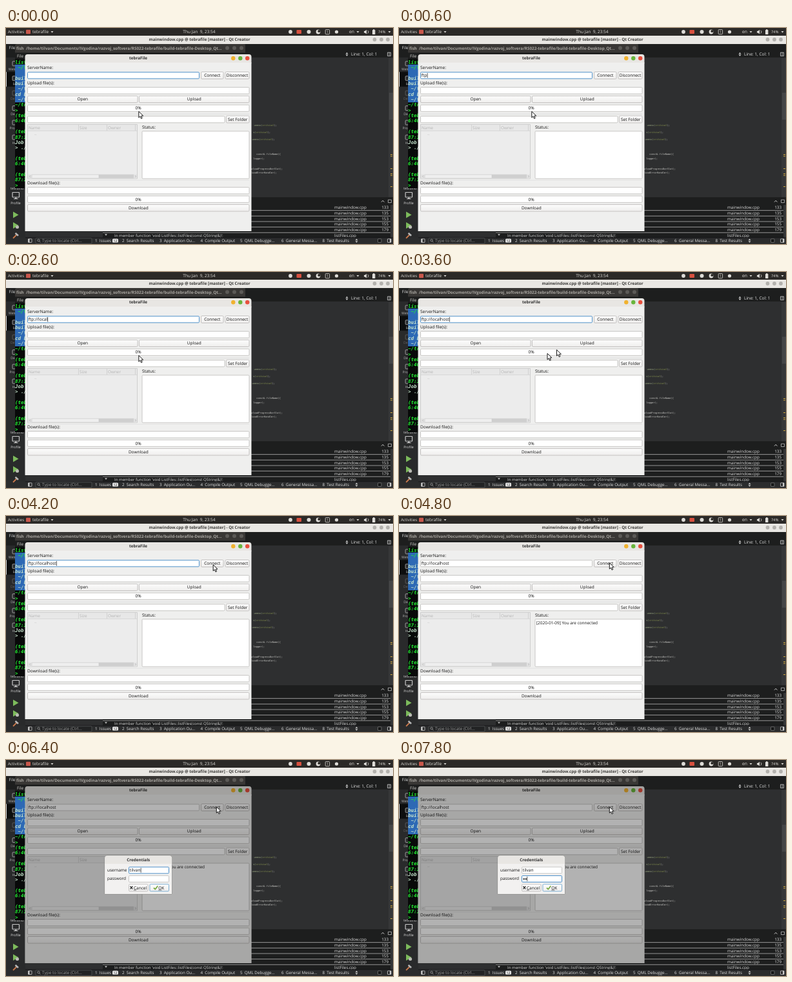
Animation of 600 by 337 pixels, one loop 8000 ms. Source, as an HTML page with a canvas:

```html
<!DOCTYPE html>
<html lang="en">
<head>
<meta charset="utf-8">
<title>tebraFile</title>
<style>
html, body { margin: 0; width: 100%; height: 100%; overflow: hidden; background: #1c1c1c; }
canvas { display: block; }
</style>
</head>
<body>
<canvas id="stage" width="600" height="337"></canvas>
<script>
const g = document.getElementById('stage').getContext('2d');
const LOOP = 8000;
const SANS = '"Open Sans", "Noto Sans", sans-serif';
const MONO = '"DejaVu Sans Mono", monospace';
const USER = 'tilvan';
const HOST = 'ftp://localhost';
const INK = '#121212';
const PANEL = '#1d1e1e';

function rect(x, y, w, h, color) {
  g.fillStyle = color;
  g.fillRect(x, y, w, h);
}

function box(x, y, w, h, r, fill, stroke, width = 0.8) {
  g.beginPath();
  g.roundRect(x, y, w, h, r);
  g.fillStyle = fill;
  g.fill();
  if (!stroke) return;
  g.strokeStyle = stroke;
  g.lineWidth = width;
  g.stroke();
}

function dot(x, y, r, color) {
  g.beginPath();
  g.arc(x, y, r, 0, Math.PI * 2);
  g.fillStyle = color;
  g.fill();
}

function poly(points, color) {
  g.beginPath();
  points.forEach(([x, y]) => g.lineTo(x, y));
  g.closePath();
  g.fillStyle = color;
  g.fill();
}

function line(points, color, width = 1) {
  g.beginPath();
  points.forEach(([x, y]) => g.lineTo(x, y));
  g.strokeStyle = color;
  g.lineWidth = width;
  g.stroke();
}

function text(s, x, y, color, { size = 6.6, style = '500', align = 'left', font = SANS } = {}) {
  g.font = `${style} ${size}px ${font}`;
  g.textAlign = align;
  g.fillStyle = color;
  g.fillText(s, x, y);
  return g.measureText(s).width;
}

const bold = { style: 'bold', size: 6.35 };
const center = { align: 'center' };

const down = (x, y, color) => poly([[x - 2, y - 1], [x + 2, y - 1], [x, y + 1.5]], color);
const up = (x, y, color) => poly([[x - 2, y + 1], [x + 2, y + 1], [x, y - 1.5]], color);

function topBar() {
  rect(0, 0, 600, 12, '#2b2927');
  const ink = '#dedcd8';
  text('Activities', 3, 8.3, ink, { size: 6.1 });
  box(31, 2.8, 7, 6.4, 1, '#c9574c');
  text('tebrafile', 41, 8.3, ink, { size: 6.5 });
  down(71.5, 6, ink);
  text('Thu Jan  9, 23:54', 299.5, 8.3, ink, { ...center, size: 6.6 });
  dot(441, 6, 2.9, ink);
  box(450.5, 3, 7.5, 6, 1, '#d9503f');
  dot(469.5, 6, 3, ink);
  dot(484, 6, 3.4, ink);
  dot(485.4, 5, 2.1, '#2b2927');
  box(495.2, 2.5, 6.4, 7.2, 1, '#2b2927', ink);
  text('1', 498.4, 8.2, ink, { ...center, size: 5.5 });
  dot(512.5, 6, 2.6, ink);
  text('en', 532, 8.3, ink, { size: 6.8 });
  down(545.5, 6, ink);
  poly([[555, 4.7], [556.7, 4.7], [559, 2.7], [559, 9.5], [556.7, 7.5], [555, 7.5]], ink);
  g.beginPath();
  g.arc(559, 6.1, 2.8, -1, 1);
  g.strokeStyle = ink;
  g.lineWidth = 0.9;
  g.stroke();
  box(568, 3, 4.4, 7, 0.6, ink);
  rect(569.2, 2, 2, 1, ink);
  text('74%', 577, 8.2, ink, { size: 5.8 });
  down(594.5, 6, ink);
}

function editor() {
  rect(0, 12, 600, 325, '#2e2f30');
  rect(0, 12, 600, 13, '#e9e7e3');
  text('mainwindow.cpp @ tebrafile [master] - Qt Creator', 300, 20.4, '#3c3b39', { ...bold, align: 'center' });
  [571.5, 582, 592].forEach(x => dot(x, 18, 2.9, '#b3b1ad'));

  rect(371, 25, 229, 21, PANEL);
  up(528.5, 39.5, '#ccc');
  down(528.5, 42.5, '#ccc');
  text('Line: 1, Col: 1', 535, 43.2, '#e2e2e2');
  box(591.5, 38.2, 5, 5.5, 0, PANEL, '#ccc');
  rect(593.7, 38.2, 0.8, 5.5, '#ccc');

  const code = { size: 3.7, align: 'right', font: MONO };
  [['uness(', 'critical', 152.6, 420], ['s(', 'critical', 163.8, 410], ['uness(', 'critical', 175, 417]]
    .forEach(([head, word, y, end]) => {
      const tail = text(');', end, y, '#b9b9b4', code);
      const w = text(word, end - tail, y, '#8c9a52', { ...code, style: 'italic' });
      text(head, end - tail - w, y, '#9fae86', code);
    });
  [['const& fileName){', 198, 426], ['logger);', 204.5, 401], ['MainWindow::uploadProgressBarSlot);', 221, 429], ['MainWindow::uploadErrorHandler);', 227, 420]]
    .forEach(([s, y, end]) => text(s, end, y, '#c9c9c5', code));
  rect(593, 47, 7, 217, '#363738');
  rect(594, 101, 6, 42, '#454647');
  [197, 199.5, 219, 227, 229.5, 247].forEach(y => rect(596, y, 3, 1, '#d1a83c'));
}

function issues() {
  rect(150, 264, 450, 63, PANEL);
  line([[582, 271.5], [584.2, 269.2], [586.4, 271.5]], '#ccc');
  box(592.5, 268, 5, 4.5, 0, PANEL, '#bbb');
  [133, 135, 153, 155, 179].forEach((n, i) => {
    const y = 282.3 + i * 8.65;
    text('mainwindow.cpp', 509, y, '#dedede', { size: 6.3 });
    text(n, 593, y, '#dedede', { size: 6.3, align: 'right' });
    rect(150, y + 1.9, 446, 0.9, '#a2a2a2');
  });
  text("In member function 'void ListFiles::listFiles(const QString&)':", 168, 325.6, '#dadada', { size: 6.1 });
  text('listFiles.cpp', 509, 325.6, '#dedede', { size: 6.3 });
  rect(596, 276, 4, 51, '#343536');
  down(155, 322.5, '#c8c8c8');

  rect(0, 327, 600, 10, '#2b2c2d');
  rect(30, 326.6, 570, 0.8, '#121314');
  box(34.5, 329, 5.5, 5.5, 0.5, '#2b2c2d', '#ccc');
  rect(34.5, 329, 2, 5.5, '#ccc');
  box(46, 328, 87, 8.3, 1, '#222324', '#555657');
  g.beginPath();
  g.arc(50.5, 331.3, 1.7, 0, Math.PI * 2);
  g.strokeStyle = '#aaa';
  g.lineWidth = 0.8;
  g.stroke();
  line([[51.7, 332.6], [53.3, 334.4]], '#aaa', 0.8);
  text('Type to locate (Ctrl...', 56, 334.3, '#999', { size: 6.5 });
  [['1  Issues', 138], ['2  Search Results', 180], ['3  Application Ou...', 238], ['4  Compile Output', 301.5],
    ['5  QML Debugge...', 363], ['6  General Messa...', 427], ['8  Test Results', 490.5]]
    .forEach(([s, x]) => text(s, x, 334.2, '#e2e2e2', { size: 6.3 }));
  box(165, 328.8, 9, 6, 1.5, '#e2e2e2');
  text('12', 169.5, 333.9, '#222', { ...center, size: 5.2 });
  up(543.5, 330.3, '#ccc');
  down(543.5, 333.5, '#ccc');
  box(576.5, 329, 5.5, 5.5, 0.5, '#151616', '#777');
  box(591.5, 329, 5.5, 5.5, 0.5, '#2b2c2d', '#ccc');
  rect(595, 329, 2, 5.5, '#ccc');
}

function modeBar() {
  const back = '#292a2b';
  rect(0, 25, 30, 302, back);
  rect(0, 25, 30, 21, PANEL);
  text('File', 4.5, 32.6, '#ddd', { size: 6.4 });
  rect(0, 68.5, 30, 23, '#0d0e0e');
  rect(0, 68.5, 1, 23, '#ddd');
  [['Welcome', 66], ['Edit', 89], ['Design', 112], ['Debug', 135.5], ['Projects', 158], ['Help', 181]].forEach(([s, y], i) => {
    const ink = i === 2 ? '#666' : '#b8b8b8';
    text(s, 15, y, ink, { ...center, size: 5.1 });
    box(10, y - 14, 8, 7, 1, back, ink);
  });
  text('tebraind', 7, 252, '#d0d0d0', { size: 5.1 });
  box(10, 256.5, 10.5, 7.5, 0.5, back, '#c8c8c8', 1.2);
  rect(14, 264.5, 2.5, 2, '#c8c8c8');
  rect(12, 266, 6.5, 1, '#c8c8c8');
  text('Profile', 15, 274.5, '#ddd', { ...center, size: 5.2 });
  const play = y => poly([[11, y - 5], [19.5, y], [11, y + 5]], '#7dbb5c');
  play(291.5);
  play(308);
  dot(17.5, 310.5, 2.6, '#b9bab4');
  line([[11, 328], [17, 322]], '#c9784c', 1.8);
  line([[14.5, 320], [19, 324]], '#b8b8b8', 2.4);
}

function terminal() {
  rect(14, 38, 357, 212, '#080909');
  box(14, 25, 357, 14, [3, 3, 0, 0], '#393735');
  text(`fish  /home/${USER}/Documents/IVgodina/razvoj_softvera/RS022-tebrafile/build-tebrafile-Desktop_Qt...`, 16, 33.6, '#aaa7a2', bold);
  [343, 354, 365].forEach(x => dot(x, 31.3, 3, '#5c5a57'));
  rect(14, 38.5, 357, 10, PANEL);
  text('File', 17, 46, '#d5d3cf', { size: 6.4 });
  rect(14, 57, 16, 59, '#2d69b5');
  const rows = { 0: 'list', 1: ' ~/te', 3: 'build', 4: 'build', 5: ' ~/tr', 6: 'cd bu', 7: ' ~/te', 8: '~/tr', 9: '>',
    10: '(tebr', 11: '6:46', 13: '(tebr', 14: '87:1', 15: 'Job ', 16: '> ./t', 18: '(tebr', 19: '6:46', 21: '(tebr', 22: '87:1', 23: '>' };
  for (const [row, s] of Object.entries(rows)) {
    const plain = row > 2 && row < 8 || row > 14 && row < 17;
    text(s, 14, 55.6 + row * 8.35, plain ? '#c5e3cc' : '#23f033', { size: 7.5, style: 'italic bold', font: MONO });
  }
}

function field(x, y, w, h, focused) {
  box(x + 0.5, y + 0.5, w - 1, h - 1, 1.3, '#fff', focused ? '#4c8fc8' : '#bcbab8', focused ? 1 : 0.8);
}

function input(x, y, w, h, value, focused, caret = focused) {
  field(x, y, w, h, focused);
  const width = text(value, x + 1.8, y + h - 3.3, INK);
  if (caret) rect(x + 2.1 + width, y + 1.8, 0.7, h - 3.6, '#111');
}

function button(label, x, y, w, h, active) {
  const shade = g.createLinearGradient(0, y, 0, y + h);
  shade.addColorStop(0, '#fdfdfd');
  shade.addColorStop(1, '#eeedec');
  box(x + 0.5, y + 0.5, w - 1, h - 1, 1.5, shade, active ? '#5e9cc9' : '#b9b7b5');
  text(label, x + w / 2, y + h / 2 + 2.2, INK, { ...center, size: 6.5 });
}

function titleBar(title, x, y, w) {
  box(x, y, w, 14, [4, 4, 0, 0], '#e8e6e3');
  text(title, x + w / 2, y + 8.4, '#333', { ...bold, align: 'center' });
}

function fileTree() {
  box(33.5, 150.5, 170, 84.5, 0, '#ececec', '#c6c6c6');
  rect(34, 151, 169, 9, '#e7e7e7');
  rect(34, 160, 169, 0.7, '#cfcfcf');
  [['Name', 35, 112], ['Size', 114, 156], ['Owner', 158, 200]].forEach(([s, x, edge]) => {
    text(s, x, 157.9, '#b5b5b5', { size: 6.4 });
    rect(edge, 151, 0.8, 9, '#cdcdcd');
  });
  text('..', 44, 167, '#b5b5b5');
  rect(34, 228.5, 169, 6, '#e3e3e3');
  rect(144, 228.5, 54, 6, '#cfcfcf');
  box(40, 228.8, 104, 5.6, 0.5, '#efefef', '#c6c6c6', 0.6);
  line([[38, 230], [36.5, 231.6], [38, 233.2]], '#aaa', 0.7);
  line([[200, 230], [201.5, 231.6], [200, 233.2]], '#aaa', 0.7);
}

function mainWindow(t) {
  const connected = t >= 4800;
  titleBar('tebraFile', 29.5, 41, 351);
  [[352.3, '#f1b22f'], [363.3, '#68b53b'], [374.2, '#e8503e']].forEach(([x, c]) => dot(x, 47.3, 3.2, c));
  rect(29.5, 54, 351, 263, '#efefee');
  const label = (s, x, y) => text(s, x, y, INK);
  label('ServerName:', 33, 64.3);
  input(33, 68.5, 267, 11, typedHost(t), !connected, !connected && t >= 200);
  button('Connect', 302, 68, 35.5, 12);
  button('Disconnect', 339.5, 68, 38, 12);
  label('Upload file(s):', 33, 88.2);
  field(33, 92, 344.5, 11.3);
  button('Open', 33, 105.5, 171.5, 11.5);
  button('Upload', 206, 105.5, 171.5, 11.5);
  field(33, 119.5, 344.5, 11.3);
  text('0%', 205, 127.4, INK, center);
  rect(33, 133.8, 344, 0.7, '#d2d2d2');
  field(33, 137, 306.5, 11.3);
  button('Set Folder', 341, 136.5, 36.5, 12);
  fileTree();
  label('Status:', 211, 156.9);
  field(210.5, 160.5, 167, 75);
  if (connected) text('[2020-01-09] You are connected', 213, 169, INK, { size: 6.45 });
  rect(33, 237, 344, 0.6, '#dcdcdc');
  label('Download file(s):', 33, 243.9);
  field(33, 248, 344.5, 11.3);
  field(33, 261.5, 344.5, 11.3);
  text('0%', 205, 269.5, INK, center);
  button('Download', 33, 275, 344.5, 11.5);
}

function dialog(t) {
  box(29.5, 41, 351, 276, [4, 4, 0, 0], 'rgba(0,0,0,0.3)');
  const onPassword = t >= 7200;
  box(153, 149, 104.3, 60.3, [4, 4, 1, 1], '#f2f1f0', '#787775', 0.6);
  titleBar('Credentials', 153.2, 149.2, 104);
  rect(153.3, 162, 103.7, 47, '#f2f1f0');
  text('username', 157, 174, INK, { size: 6.45 });
  text('password', 157, 187.4, INK, { size: 6.45 });
  input(190, 166.5, 63, 11, USER.slice(0, steps(t, 5400, USER.length)), !onPassword);
  input(190, 180, 63, 11, '', onPassword, false);
  const dots = steps(t, 7600, 2);
  for (let i = 0; i < dots; i++) dot(193.7 + i * 3.1, 185.6, 1.2, '#222');
  if (onPassword) rect(192.2 + dots * 3.1, 181.8, 0.7, 7.4, '#111');

  button('', 190, 193.3, 30.5, 12);
  line([[192.5, 197], [196.3, 201.4]], '#2b2b2b', 1.3);
  line([[196.3, 197], [192.5, 201.4]], '#2b2b2b', 1.3);
  text('Cancel', 198, 201.6, INK, { size: 6.5 });
  rect(198, 202.7, 4, 0.6, INK);
  button('', 222.5, 193.3, 30.5, 12, true);
  line([[229, 199.5], [231.3, 201.7], [235.3, 196.5]], '#79ab45', 1.8);
  text('OK', 236.3, 201.6, INK, { size: 6.5 });
  rect(236.3, 202.7, 5, 0.6, INK);
}

// One more item every 200 ms from `start`, up to `max`.
function steps(t, start, max) {
  return Math.max(0, Math.min(max, Math.floor((t - start) / 200) + 1));
}

const keyTimes = [200, 400, 600, 1000, 1400, 1600, 1800, 2000, 2000, 2200, 2600, 2800, 3000, 3200, 3600];
const typedHost = t => HOST.slice(0, keyTimes.filter(k => k <= t).length);

function pointer(x, y) {
  g.beginPath();
  [[0, 0], [0, 9.6], [2.2, 7.6], [3.8, 11.2], [5.4, 10.4], [3.9, 7], [6.9, 6.8]]
    .forEach(([dx, dy]) => g.lineTo(x + dx, y + dy));
  g.closePath();
  g.fillStyle = '#fff';
  g.fill();
  g.strokeStyle = '#161616';
  g.lineWidth = 1;
  g.lineJoin = 'round';
  g.stroke();
}

function mouse(t) {
  if (t < 3600) return pointer(205.8, 130.2);
  if (t < 3800) pointer(230, 127);
  const p = Math.min(1, (t - 3600) / 800);
  const ease = p * (2 - p);
  pointer(244.5 + 81.8 * ease, 121.3 - 48.3 * ease);
}

function draw(now) {
  const t = Math.floor((now % LOOP) / 200) * 200;
  g.textRendering = 'geometricPrecision';
  editor();
  issues();
  modeBar();
  topBar();
  terminal();
  mainWindow(t);
  if (t >= 5000) dialog(t);
  mouse(t);
}

let origin;
function tick(now) {
  origin ??= now;
  draw(now - origin);
  requestAnimationFrame(tick);
}
draw(0);
requestAnimationFrame(tick);
</script>
</body>
</html>
```
